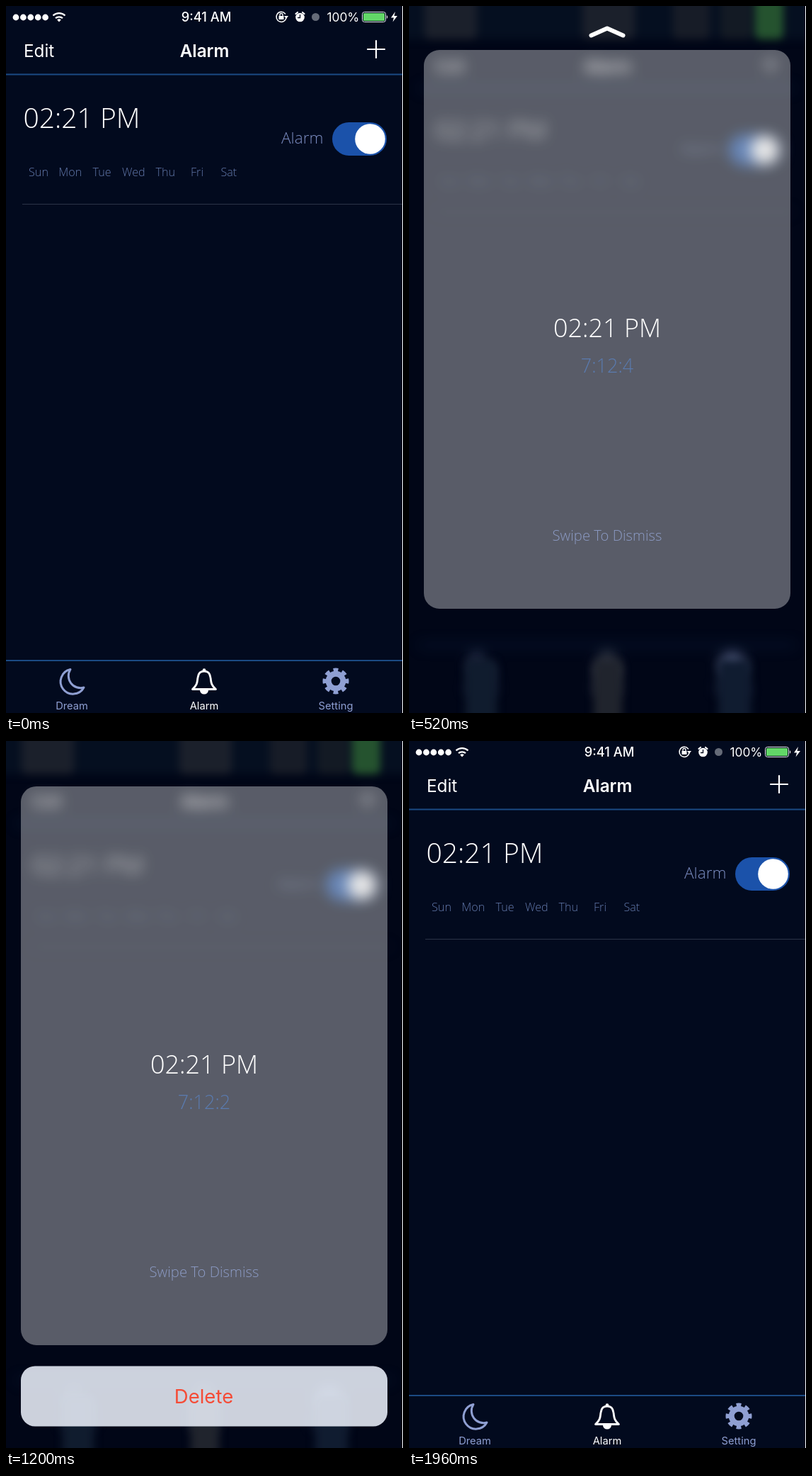
An HTML page that plays this animation: 561 by 997 pixels, repeating every 2 s.

```html
<!DOCTYPE html>
<html lang="en">
<head>
<meta charset="utf-8">
<title>Alarm peek</title>
<style>
html, body { margin: 0; width: 100%; height: 100%; overflow: hidden; background: #fff; }
svg { position: absolute; left: 0; top: 0; }
text { font-family: Inter, Roboto, sans-serif; fill: #fff; }
.thin { font-family: "Open Sans", "Noto Sans", sans-serif; font-weight: 300; }
.mid { text-anchor: middle; }
.line { fill: none; stroke: #fff; stroke-linecap: round; stroke-linejoin: round; }
</style>
</head>
<body>
<svg width="560" height="997" viewBox="0 0 560 997">
  <rect id="base" width="560" height="997"/>

  <g id="list">
    <g id="status">
      <g id="dots" fill="#fff"></g>
      <g class="line" stroke-width="2.3" style="stroke-linecap:butt">
        <path d="M66.5 13.5a12.5 12.5 0 0 1 17 0M70 17.2a7.5 7.5 0 0 1 10 0"/>
      </g>
      <path d="M75 22.5l-2.8-3.1a4.2 4.2 0 0 1 5.6 0z" fill="#fff"/>
      <text class="mid" x="283" y="22" font-size="18.3" font-weight="500">9:41 AM</text>
      <path class="line" d="M396 16a7 7 0 1 1-1.5-5" stroke-width="1.5"/>
      <path d="M393 14h6l-3 4zM385.500 14h7v5h-7z" fill="#fff"/>
      <path class="line" d="M387 14v-1.500a2 2 0 0 1 4 0v1.500" stroke-width="1.300"/>
      <circle cx="415.500" cy="16" r="6.300" fill="#fff"/>
      <path class="line" d="M409.500 11l2.500-2M421.500 11l-2.500-2" stroke-width="2.200"/>
      <path d="M415.500 12v4.500h-3.500" fill="none" stroke="#020a1e" stroke-width="1.300"/>
      <circle cx="437.500" cy="15.500" r="5.500" fill="#656b78"/>
      <text x="453.500" y="22" font-size="17.300">100%</text>
      <rect x="503.500" y="8.500" width="33" height="14" rx="3" fill="none" stroke="#e8eaee"/>
      <rect x="505" y="10" width="30" height="11" rx="1.500" fill="#62d767"/>
      <path d="M538 13q2.500 2.500 0 5zM550 8l-6 8.500h4l-1.500 6 6.500-8.500h-4.500z" fill="#fff"/>
    </g>

    <text x="25" y="72" font-size="24.300">Edit</text>
    <text class="mid" x="280.500" y="72" font-size="24.300" font-weight="600">Alarm</text>
    <path class="line" d="M511 61h24M523 49v24" stroke-width="2.200"/>
    <path d="M0 96.500h560M0 923h560" stroke="#1b4a83" stroke-width="1.800"/>
    <path d="M23 279.500h537" stroke="#2b3347"/>

    <text class="thin" x="24.500" y="172" font-size="39">02:21 PM</text>
    <g id="days"></g>
    <text class="thin" x="389" y="194" font-size="22.600" style="fill:#7b8cc0">Alarm</text>
    <rect x="461" y="164" width="77" height="47" rx="23.500" fill="#1b52aa"/>
    <circle cx="514.500" cy="187.500" r="21.300" fill="#fff"/>

    <path class="line" d="M91 935.500A17.500 17.500 0 1 0 110 961A17 17 0 0 1 91 935.500z" stroke-width="3" style="stroke:#8f9fd2"/>
    <path class="line" d="M263.500 963.500H296.500C289 957 290 953 289 947C288 940 285 938 280 938C275 938 272 940 271 947C270 953 271 957 263.500 963.500z" stroke-width="2.800"/>
    <circle cx="280" cy="936.500" r="2.300" fill="#fff"/>
    <path d="M274 965a6 5.500 0 0 0 12 0z" fill="#fff"/>
    <g fill="none" stroke="#8f9fd2">
      <circle cx="466" cy="952" r="10.300" stroke-width="8"/>
      <circle cx="466" cy="952" r="15.500" stroke-width="6" pathLength="16" stroke-dasharray="1.100 .9" stroke-dashoffset=".55"/>
    </g>
    <g id="tabs"></g>
  </g>

  <g id="smears" style="filter:blur(6px)"></g>

  <path id="arrow" class="line" d="M257.500 41.500L280 31.500L302.500 41.500" stroke-width="6"/>

  <g id="card">
    <rect x="-259" y="-394" width="518" height="788" rx="22" fill="#fff" fill-opacity=".35"/>
    <text class="thin mid" y="11" font-size="36">02:21 PM</text>
    <text id="count" class="thin mid" y="61" font-size="27" style="fill:#5a7aae"></text>
    <text class="thin mid" y="298" font-size="20.300" style="fill:#8b9ac4"></text>
  </g>

  <g id="action">
    <rect x="21" width="518" height="85" rx="20" fill="#e9eef9" fill-opacity=".88"/>
    <text class="mid" x="279.500" y="53" font-size="27.500" style="fill:#f54b36">Delete</text>
  </g>
</svg>
<script>
const $ = id => document.getElementById(id);
const LOOP = 2000, STEP = 40;

document.querySelector('#card text:last-child').textContent = 'Swipe To Dismiss';
$('dots').innerHTML = [0, 1, 2, 3, 4].map(i =>
  `<circle cx="${14 + i * 10.4}" cy="16" r="4.400"/>`).join('');
$('days').innerHTML = ['Sun', 'Mon', 'Tue', 'Wed', 'Thu', 'Fri', 'Sat'].map((day, i) =>
  `<text class="thin mid" x="${46 + i * 44.8}" y="240" font-size="16.200" style="fill:#6379ab">${day}</text>`).join('');
$('tabs').innerHTML = [['Dream', 93, '#8f9fd2'], ['Alarm', 280, '#fff'], ['Setting', 466, '#8f9fd2']].map(([name, x, fill]) =>
  `<text class="mid" x="${x}" y="992" font-size="14.700" style="fill:${fill}">${name}</text>`).join('');

// Blurred bars that bleed off the top and bottom edges: x, width, y, colour
$('smears').innerHTML = [
  [-20, 600, -30, '#050f20'], [22, 74, -30, '#1b202b'], [245, 74, -30, '#1b202b'],
  [373, 52, -30, '#171c27'], [440, 45, -30, '#131a24'], [489, 40, -30, '#25532f'],
  [80, 44, 922, '#101c2e'], [261, 40, 922, '#20242d'], [437, 46, 922, '#101c30']
].map(([x, w, y, fill]) =>
  `<rect x="${x}" y="${y}" width="${w}" height="${y < 0 ? 77 : 105}" rx="8" fill="${fill}"/>`).join('');

const mix = (a, b, k) => a + (b - a) * k;
const ramp = (t, a, b) => {
  const k = Math.min(1, Math.max(0, (t - a) / (b - a)));
  return k * k * (3 - 2 * k);
};
// Smooth interpolation through [time, value] points
const track = (t, points) => points.reduce((v, [time, value], i) =>
  i ? mix(v, value, ramp(t, points[i - 1][0], time)) : value, 0);

const HEIGHT = [[240, 498], [520, 456], [600, 454], [960, 457.5], [1480, 458.5], [1720, 458.8], [1800, 498.3]];

function draw(t) {
  const blur = ramp(t, 10, 130) * (1 - ramp(t, 1800, 1950));
  const open = t < 40 ? 0 : t < 1800 ? 1 - Math.exp((40 - t) / 35) : 1 - ramp(t, 1800, 1950);
  const cy = mix(190, track(t, HEIGHT), open);
  const size = mix(.26, 1, open);
  const soft = t > 400 && t <= 1800 ? 0 : Math.min(12, 50 * (1 - open));

  $('base').setAttribute('fill', `rgb(${mix(2, 1, blur)},${mix(10, 6, blur)},${mix(30, 23, blur)})`);
  $('list').setAttribute('transform', `translate(280 498) scale(${1 - .05 * blur}) translate(-280 -498)`);
  $('list').style.filter = blur ? `blur(${10 * blur}px) brightness(${1 - .15 * blur})` : 'none';
  $('status').style.opacity = 1 - blur;
  $('smears').style.opacity = blur;

  $('card').setAttribute('transform', `translate(280 ${cy}) scale(${size})`);
  $('card').style.opacity = open;
  $('card').style.filter = soft > .2 ? `blur(${soft}px)` : 'none';
  $('count').textContent = '7:12:' + (5 - Math.floor((t + 320) / 500));

  const leave = ramp(t, 560, 700);
  $('arrow').setAttribute('transform', `translate(0 ${cy - 456 - 34 * leave})`);
  $('arrow').style.opacity = ramp(t, 240, 360) * (1 - leave);

  const shown = ramp(t, 560, 780) * (1 - ramp(t, 1720, 1800));
  $('action').setAttribute('transform', `translate(0 ${cy + 423.5 + 140 * (1 - shown)})`);
  $('action').style.opacity = shown ? 1 : 0;
}

const start = performance.now();
function frame() {
  const t = (performance.now() - start) % LOOP;
  draw(Math.floor(t / STEP) * STEP);
  requestAnimationFrame(frame);
}
frame();
</script>
</body>
</html>
```
